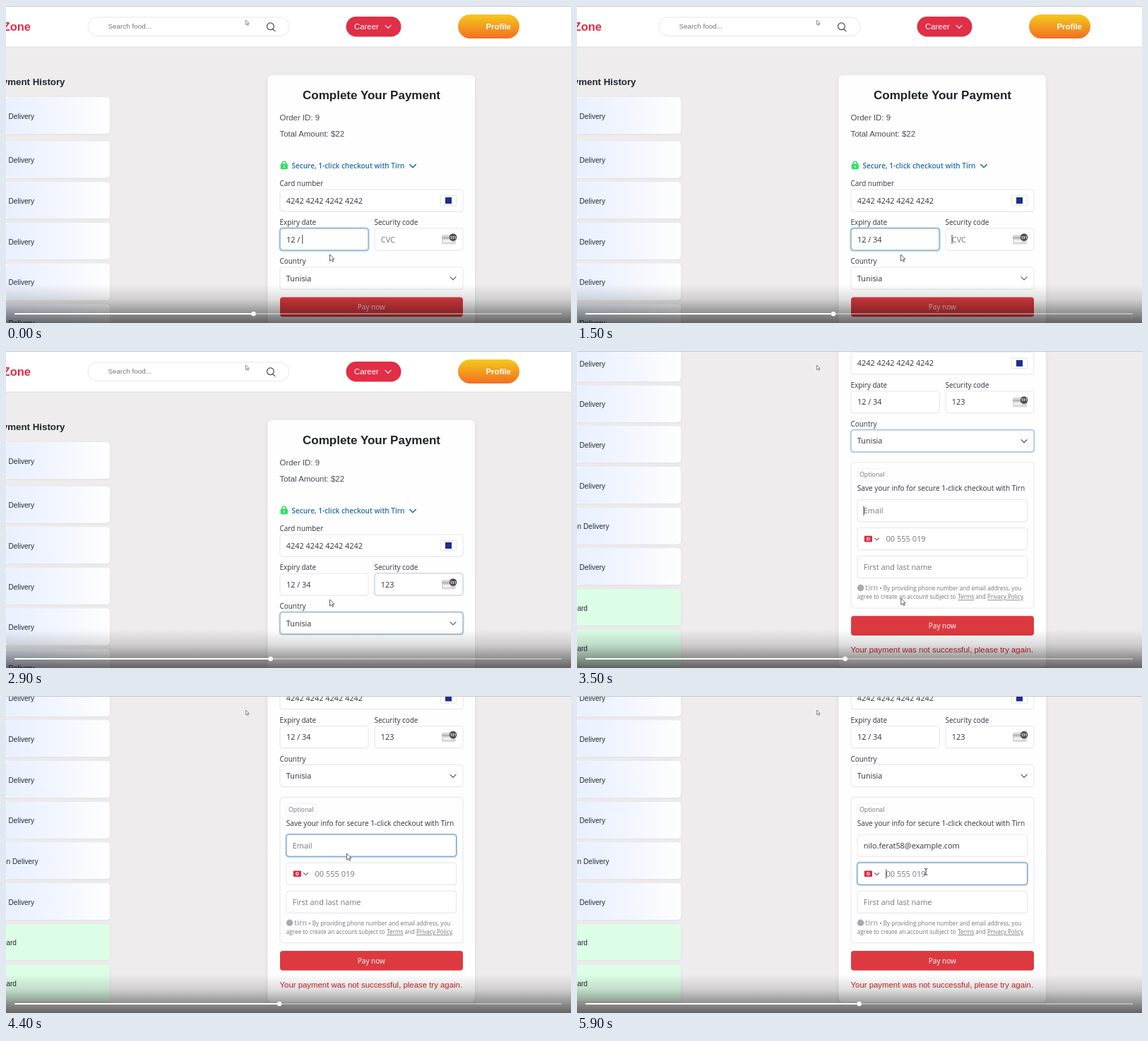
An HTML page for the animation above (6000 ms loop, 800 by 449 pixels).

```html
<!DOCTYPE html>
<html lang="en">
<head>
<meta charset="utf-8">
<title>Payment form</title>
<style>
html, body { margin: 0; width: 100%; height: 100%; overflow: hidden; background: #eeeced; }
svg { display: block; width: 100vw; height: 100vh; }
text { font-family: "Liberation Sans", Arial, sans-serif; white-space: pre; }
.ui { font-family: "Open Sans", "Noto Sans", sans-serif; }
.line { fill: none; stroke-linecap: round; stroke-linejoin: round; }
.card { filter: drop-shadow(0 2px 3px rgba(0,0,0,.07)); }
.row { filter: drop-shadow(0 1px 2px rgba(0,0,0,.05)); }
</style>
</head>
<body>
<svg id="stage" viewBox="0 0 800 449" preserveAspectRatio="none">
  <defs>
    <linearGradient id="row"><stop offset="0" stop-color="#e9f0fe"/><stop offset=".5" stop-color="#f2f6fe"/><stop offset="1" stop-color="#fefefe"/></linearGradient>
    <linearGradient id="gold" x2="0" y2="1"><stop offset="0" stop-color="#f5c91c"/><stop offset="1" stop-color="#f26f21"/></linearGradient>
    <linearGradient id="shade" x2="0" y2="1">
      <stop offset="0" stop-color="#000" stop-opacity="0"/>
      <stop offset=".4" stop-color="#000" stop-opacity=".13"/>
      <stop offset="1" stop-color="#000" stop-opacity=".58"/>
    </linearGradient>
  </defs>
  <g id="page"></g>
  <g id="player"></g>
</svg>
<script>
const $ = id => document.getElementById(id);
const clamp = (v, a = 0, b = 1) => Math.min(b, Math.max(a, v));
const ramp = (t, a, b) => clamp((t - a) / (b - a));
const smooth = p => p * p * (3 - 2 * p);

// Markup helpers
const rect = (x, y, w, h, r, fill, more = '') =>
  `<rect x="${x}" y="${y}" width="${w}" height="${h}" rx="${r}" fill="${fill}" ${more}/>`;
const text = (x, y, size, fill, str, more = '') =>
  `<text x="${x}" y="${y}" font-size="${size}" fill="${fill}" ${more}>${str}</text>`;
const ui = (x, y, size, fill, str, more = '') => text(x, y, size, fill, str, 'class="ui" ' + more);
const chevron = (x, y, w, color, width = 1.2) =>
  `<path class="line" d="M${x - w / 2} ${y - w / 4}l${w / 2} ${w / 2}l${w / 2} ${-w / 2}" stroke="${color}" stroke-width="${width}"/>`;
const circle = (x, y, r, fill) => `<circle cx="${x}" cy="${y}" r="${r}" fill="${fill}"/>`;

const INK = '#30313d', HINT = '#75767d', RED = '#dc3a40';
const BOLD = 'font-weight="700"', END = 'text-anchor="end"', MID = 'text-anchor="middle"';

function field(id, x, y, w) {
  return `<rect id="${id}Glow" x="${x - .6}" y="${y - .6}" width="${w + 1.2}" height="32.2" rx="4" fill="none" stroke="#2f86d0" stroke-opacity=".3" stroke-width="2.4" opacity="0"/>`
    + rect(x, y + 1, w, 31, 3.5, '#000', 'opacity=".03"')
    + rect(x, y, w, 31, 3.5, '#fff', 'stroke="#e6e6e9"')
    + `<rect id="${id}Edge" x="${x}" y="${y}" width="${w}" height="31" rx="3.5" fill="none" stroke="#6a9cc8" opacity="0"/>`;
}

function header() {
  return rect(0, 0, 800, 59, 0, '#000', 'opacity=".04"')
    + rect(0, 0, 800, 57.5, 0, '#fff')
    + text(35, 35, 16.5, '#e02f46', 'Zone', BOLD + ' ' + END)
    + rect(116, 16, 285, 26.5, 13.2, '#fff', 'stroke="#e6e7eb"')
    + text(144.5, 32.3, 9.9, '#757575', 'Search food...')
    + '<path class="line" d="M378 33l3 2.6M369.5 28.8a4.9 4.9 0 1 0 9.8 0a4.9 4.9 0 1 0-9.8 0" stroke="#444a55" stroke-width="1.2"/>'
    + rect(481.5, 15, 78, 28.5, 14.2, '#e02f46')
    + text(493, 33.2, 11.4, '#fff', 'Career')
    + chevron(541, 29.3, 8, '#fff')
    + rect(640, 12, 87, 34, 17, 'url(#gold)')
    + text(679.5, 33.2, 11.4, '#fff', 'Profile', BOLD);
}

function history() {
  let out = text(83.5, 111.8, 13.3, '#1f2430', 'Payment History', BOLD + ' ' + END);
  for (let i = 0; i < 10; i++) {
    const y = i ? 191.8 + (i - 1) * 57.65 : 129.3, paid = i > 7;
    out += rect(-200, y, 347, 51.5, 5, paid ? '#dcfde6' : '#fefefe', 'class="row"');
    if (!paid) out += rect(0, y, 147, 51.5, 5, 'url(#row)');
    out += text(paid ? 15 : i === 6 ? 45.5 : 40, y + 30.4, 10.1, '#262b36',
      paid ? 'Card' : 'Cash on Delivery', END);
  }
  return out;
}

function form() {
  const label = (x, y, s) => ui(x, y, 9.95, INK, s);
  return rect(370.5, 98, 293.5, 608.5, 6, '#fefefe', 'class="card"')
    + text(517.5, 132, 17, '#1f2229', 'Complete Your Payment', BOLD + ' ' + MID)
    + text(387.5, 161.5, 11.45, '#464b57', 'Order ID: 9')
    + text(387.5, 184.6, 11.45, '#464b57', 'Total Amount: $22')
    + '<path class="line" d="M391.2 225v-2.2a2.6 2.6 0 0 1 5.2 0v2.2" stroke="#2fdb62" stroke-width="1.6"/>'
    + rect(388.7, 223.8, 10.2, 7.4, 1.4, '#2fe068')
    + rect(393.2, 226, 1.2, 3, .6, '#fff')
    + ui(404.5, 230.1, 10, '#1f6fa6', 'Secure, 1-click checkout with Tirn', 'font-weight="600"')
    + chevron(576, 226.7, 8.4, '#1f6fa6', 1.5)
    + label(387.5, 255, 'Card number') + field('number', 388, 260, 259)
    + ui(396.8, 279.6, 10.9, INK, '4242 4242 4242 4242')
    + rect(615.5, 268.2, 22, 14.6, 1.5, '#fff', 'stroke="#dcdce0" stroke-width=".8"')
    + rect(622, 271, 9, 9, 0, '#1c2c92')
    + label(387.5, 310.4, 'Expiry date') + field('expiry', 388, 315, 125)
    + ui(397, 334.5, 10.9, INK, '', 'id="expiryText"')
    + label(521.5, 310.4, 'Security code') + field('code', 522, 315, 125)
    + ui(530.8, 334.5, 10.9, HINT, 'CVC', 'id="codeText"')
    + rect(617, 324, 20, 13.6, 1.8, '#d9d9dc') + rect(617, 327, 20, 2.6, 0, '#b5b5ba')
    + rect(619, 331.5, 11, 3, 0, '#f4f4f5')
    + circle(633, 327.6, 5.3, '#4b4c52')
    + ui(633, 329.5, 5, '#fff', '131', BOLD + ' ' + MID)
    + label(387.5, 365.2, 'Country') + field('country', 388, 370, 259)
    + ui(396.8, 389.5, 10.9, INK, 'Tunisia') + chevron(633, 385.9, 8, '#5b5c66', 1.3)
    + `<g id="save">${saveBox()}</g>`
    + `<g id="pay">${rect(388, 633.5, 259, 27.7, 4, RED)}${ui(517.3, 651.2, 10, '#fff', 'Pay now', 'id="payText" font-weight="500" ' + MID)}</g>`
    + text(387.5, 685.4, 11.4, '#cb2430', 'Your payment was not successful, please try again.');
}

function saveBox() {
  const note = (x, y, s, more) => ui(x, y, 8.15, HINT, s, more);
  const under = 'text-decoration="underline"';
  return rect(388, 415.8, 259, 206.5, 4, '#fefefe', 'stroke="#e6e6e9"')
    + rect(397, 425, 42, 16.5, 2.5, '#fff', 'stroke="#f0f0f2"')
    + ui(400, 436.6, 8.8, '#6d6e78', 'Optional')
    + ui(396.8, 456.6, 10.1, INK, 'Save your info for secure 1-click checkout with Tirn')
    + field('email', 397, 468.7, 240.5) + ui(405.8, 488.4, 10.9, HINT, '', 'id="emailText"')
    + field('phone', 397, 508.7, 240.5) + ui(437.5, 528.4, 11, HINT, '00 555 019')
    + rect(406.8, 520, 11.2, 8.6, 1, '#df2a3f') + circle(412.4, 524.3, 2.4, '#fff') + circle(412.6, 524.3, 1.3, '#df2a3f')
    + chevron(424.5, 524.6, 6, '#5b5c66', 1.1)
    + field('name', 397, 548.7, 240.5) + ui(405.8, 568.4, 10.9, HINT, 'First and last name')
    + circle(401.6, 593.7, 4.7, '#a9aab0')
    + ui(408, 597.3, 10.5, '#a9aab0', 'tirn', 'font-weight="600"')
    + note(428.6, 597.1, '• By providing phone number and email address, you')
    + note(396.8, 609.6, 'agree to create an account subject to')
    + note(539.2, 609.6, 'Terms', under) + note(564.3, 609.6, 'and')
    + note(581, 609.6, 'Privacy Policy', under) + note(631, 609.6, '.');
}

const arrow = '<path d="M0 0V9.2L2.2 7.2L3.7 10.4L5.2 9.7L3.7 6.6H6.5Z" fill="#fff" stroke="#3a3a42" stroke-width=".8" stroke-linejoin="round"/>';

$('page').innerHTML = header() + history() + form() + '<path id="caret" stroke="#26272f" stroke-width=".9"/>';
$('player').innerHTML = rect(0, 0, 800, 1, 0, '#c6c6cd')
  + rect(0, 394, 800, 55, 0, 'url(#shade)')
  + rect(12, 434.9, 775, 2, 1, '#fff', 'opacity=".38"')
  + '<rect id="played" x="12" y="434.9" height="2" rx="1" fill="#fff"/>'
  + '<circle id="knob" cy="436" r="3.2" fill="#fff"/>'
  + `<g transform="translate(339.6 20) scale(.72)">${arrow}</g>`
  + `<g id="mouse">${arrow}</g>`
  + '<path id="beam" class="line" d="M-2-4.5q2 0 2 1.2q0-1.2 2-1.2M0-3.3V3.3M-2 4.5q2 0 2-1.2q0 1.2 2 1.2" stroke="#33343c" stroke-width="1"/>';

// Focus spans: field, start, end
const focus = [
  ['expiry', -500, 1500], ['code', 1500, 2800], ['country', 2800, 3450],
  ['email', 3500, 5750], ['phone', 5780, 9000]
];
// Caret stops: time, x, middle y
const carets = [
  [-100, 419.8, 330.5], [400, 426, 330.5], [800, 432.2, 330.5], [1500, 531, 330.5],
  [2100, 537.2, 330.5], [2400, 543.4, 330.5], [2600, 549.6, 330.5], [2800, -9, 0],
  [3500, 406, 484.5], [5100, 543, 484.5], [5780, 437.8, 524.5]
];

function fill(id, value, hint) {
  $(id).textContent = value || hint;
  $(id).setAttribute('fill', value ? INK : HINT);
}

function draw(t) {
  const open = t >= 2800;
  const scroll = 272.5 * (1 - (1 - ramp(t, 3000, 3800)) ** 3);
  $('page').setAttribute('transform', `translate(0 ${-scroll.toFixed(2)})`);

  fill('expiryText', '12 / ' + '34'.slice(0, (t >= 400) + (t >= 800)), '');
  fill('codeText', '123'.slice(0, (t >= 2100) + (t >= 2400) + (t >= 2600)), 'CVC');
  fill('emailText', t >= 5100 ? 'nilo.ferat58@example.com' : '', 'Email');

  for (const [id, from, to] of focus) {
    const glow = ramp(t, from, from + 120) * (1 - ramp(t, to, to + 150));
    $(id + 'Glow').setAttribute('opacity', glow ** 1.5);
    $(id + 'Edge').setAttribute('opacity', glow);
  }

  const [since, x, y] = carets.filter(c => c[0] <= t).pop();
  $('caret').setAttribute('d', `M${x} ${y - 6.5}v13`);
  $('caret').setAttribute('opacity', (t - since) % 1000 < 500 ? 1 : 0);

  $('save').setAttribute('opacity', ramp(t, 2900, 3100));
  $('pay').setAttribute('transform', `translate(0 ${open ? 0 : -221})`);
  $('payText').setAttribute('opacity', open ? 1 : .8);

  const up = smooth(ramp(t, 3450, 4200)), down = smooth(ramp(t, 5200, 5600));
  const mx = 458.5 + 24 * up + 11.5 * down, my = 352 - 129 * up + 26 * down;
  for (const id of ['mouse', 'beam']) {
    $(id).setAttribute('transform', `translate(${mx} ${my})`);
    $(id).setAttribute('opacity', (id === 'beam') === (down === 1) ? 1 : 0);
  }

  const head = 350.5 + t / 120;
  $('played').setAttribute('width', head - 12);
  $('knob').setAttribute('cx', head);
}

const start = performance.now();
function tick() {
  const t = (performance.now() - start) % 6000;
  draw(Math.floor(t / 100) * 100);
  requestAnimationFrame(tick);
}
tick();
</script>
</body>
</html>
```
